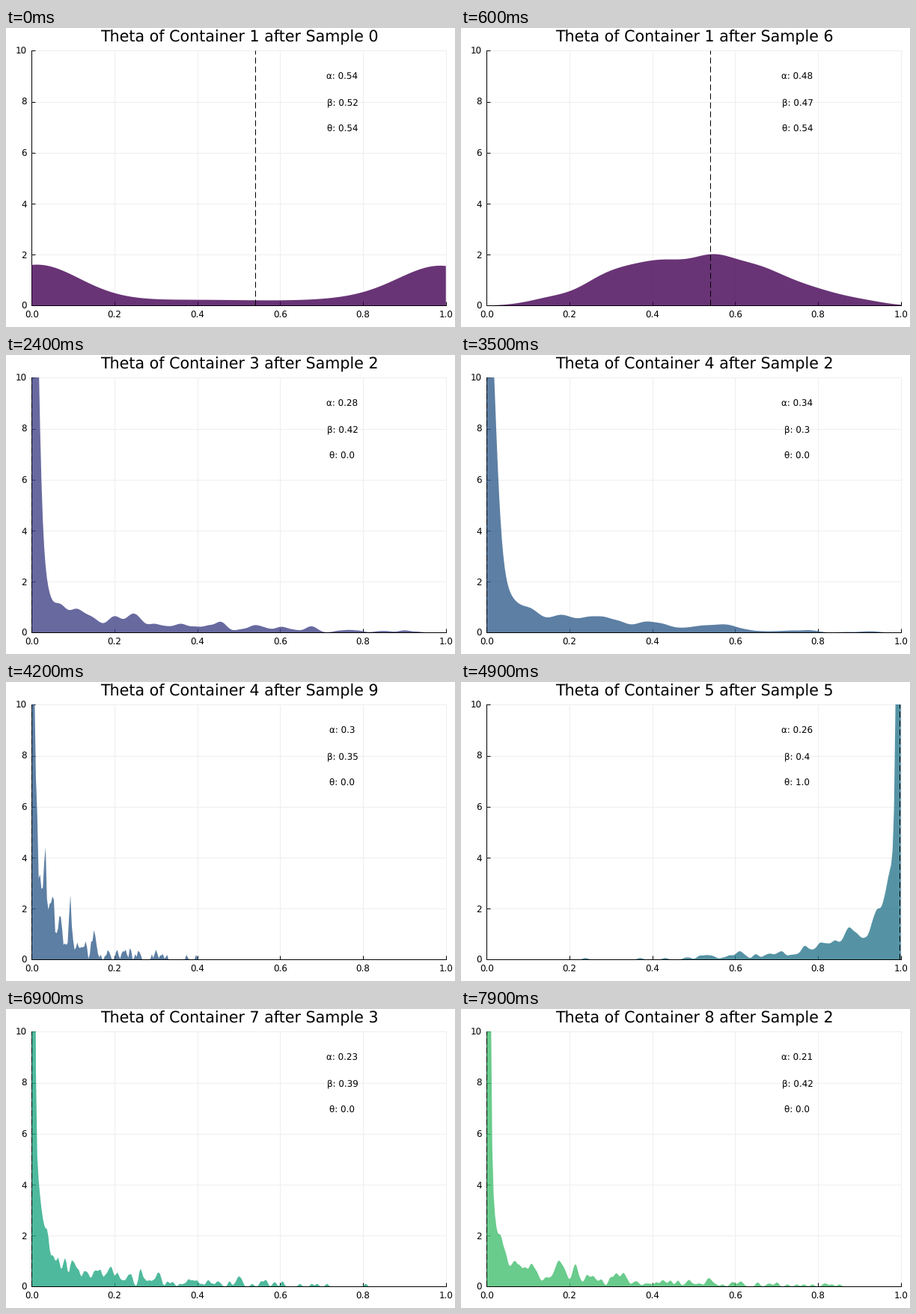
A matplotlib script that plays this animation: 600 px wide and 400 px high, repeating every 8000 ms.

```python
import numpy as np
import matplotlib.pyplot as plt
from matplotlib.animation import FuncAnimation

W, H, DPI = 600, 400, 100
PX = 72 / DPI
STEPS, FRAMES, DRAWS = 11, 80, 1000
THETA = [0.54, 0.953, 0, 0, 0.997, 0, 0, 0]

# Estimates of the prior parameters as they are learned
KNOTS = [0, 12, 24, 35, 49, 60, 79]
ALPHA = [0.54, 0.43, 0.28, 0.34, 0.26, 0.25, 0.21]
BETA = [0.52, 0.42, 0.42, 0.30, 0.40, 0.37, 0.42]

plt.rcParams.update({
    "font.family": "DejaVu Sans",
    "font.size": 11.9 * PX,
    "text.hinting": "none",
    "axes.linewidth": PX,
})


def posterior(n, sample, theta, alpha, beta):
    """Draws of theta after some samples, with uncertain prior parameters."""
    rng = np.random.default_rng(n)
    hits = round(theta * sample)
    a, b = (np.maximum(rng.gamma(0.5, 1.4 * mean, DRAWS), 1e-3)
            for mean in (alpha, beta))
    return rng.beta(a + hits, b + sample - hits)


def kde(draws, x):
    """Gaussian kernel density with Silverman's bandwidth."""
    q1, q3 = np.percentile(draws, [25, 75])
    width = 0.9 * min(draws.std(), (q3 - q1) / 1.34) * len(draws) ** -0.2
    width = max(width, 0.0018)
    z = (x[:, None] - draws) / width
    return np.exp(-z * z / 2).sum(axis=1) / (len(draws) * width * np.sqrt(2 * np.pi))


LEFT, RIGHT, TOP, BOTTOM = 34.45, 587.8, 30.4, 371.4
GRID = np.linspace(0, 1, 301)

fig = plt.figure(figsize=(W / DPI, H / DPI), dpi=DPI, facecolor="white")
ax = fig.add_axes([LEFT / W, 1 - BOTTOM / H, (RIGHT - LEFT) / W, (BOTTOM - TOP) / H])
ax.set(xlim=(0, 1), ylim=(0, 10),
       xticks=np.arange(6) / 5, yticks=range(0, 11, 2))
ax.tick_params(direction="in", length=5 * PX, width=PX, pad=5.2)
ax.tick_params(axis="y", pad=4.7)
ax.grid(color="#eeeeee", lw=PX, clip_on=False)
ax.set_axisbelow(True)
ax.spines[["top", "right"]].set_visible(False)
ax.spines[["left", "bottom"]].set_zorder(0.6)

title = fig.text(312 / W, 1 - 18.3 / H, "", size=20.7 * PX,
                 ha="center", va="baseline")
labels = [ax.text(0.75, y - 4.7 * 10 / (BOTTOM - TOP), "", ha="center", va="baseline")
          for y in (9, 8, 7)]
area, = ax.fill([0, 1, 1], [0, 0, 0], lw=0, alpha=0.8, zorder=1)
marker, = ax.plot([0, 0], [0, 10], color="black", lw=PX, ls=(0, (8, 4)),
                  dash_capstyle="butt", zorder=3, clip_on=False)


def update(n):
    index, sample = divmod(n, STEPS)
    theta = THETA[index]
    alpha, beta = (np.interp(n, KNOTS, v) for v in (ALPHA, BETA))
    y = kde(posterior(n, sample, theta, alpha, beta), GRID)
    area.set_xy(np.column_stack([np.r_[0, GRID, 1], np.r_[0, y, 0]]))
    area.set_facecolor(plt.cm.viridis(index / 10))
    marker.set_xdata([theta, theta])
    title.set_text(f"Theta of Container {index + 1} after Sample {sample}")
    for label, name, value in zip(labels, "αβθ", (alpha, beta, theta)):
        label.set_text(f"{name}: {round(float(value), 2)}")
    return area, marker, title, *labels


anim = FuncAnimation(fig, update, frames=FRAMES, interval=100,
                     repeat=True, repeat_delay=0, blit=False)
plt.show()
```
